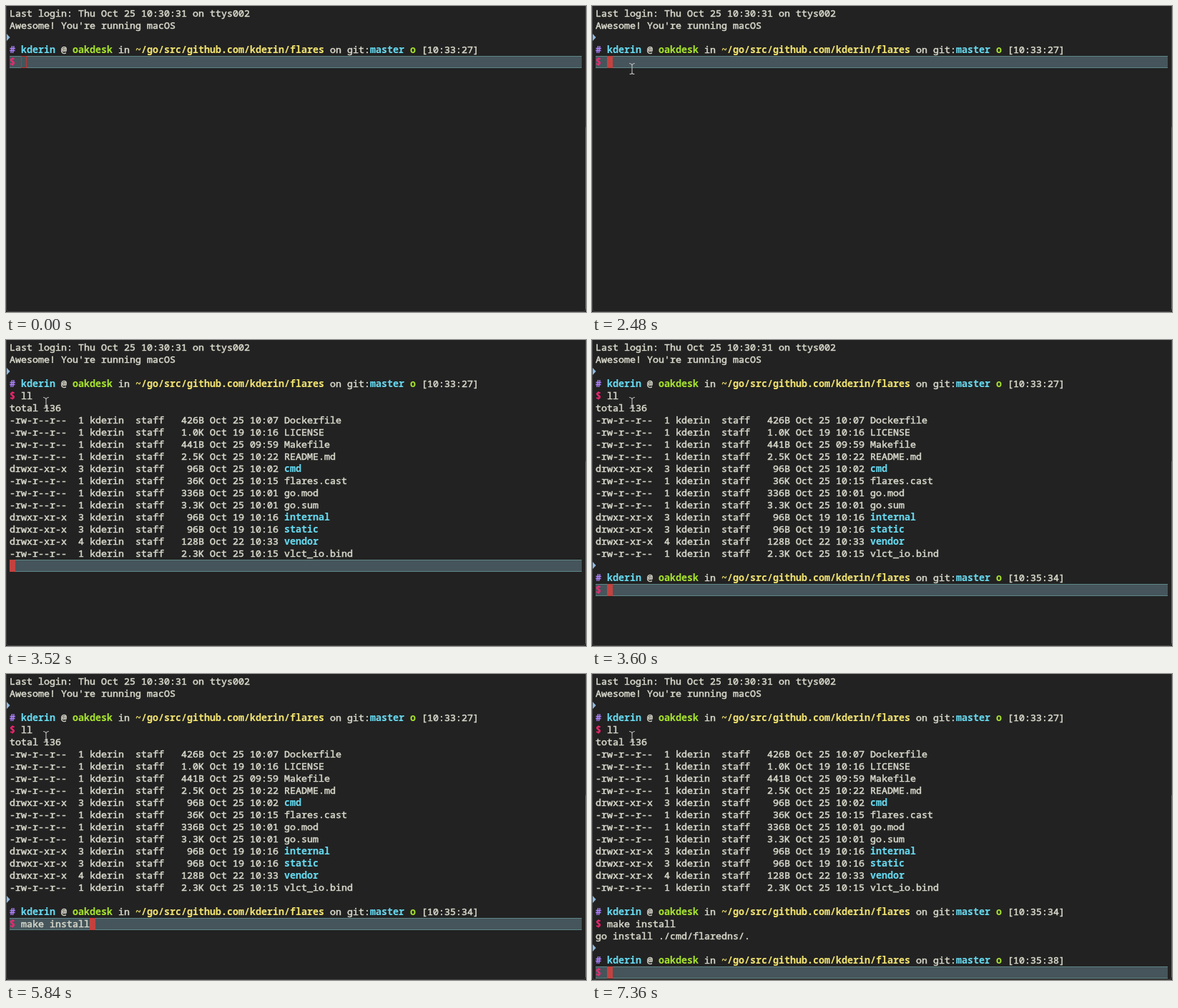
Recreate the animation shown at these times as an HTML page. Size 811 by 429 pixels, loop 8000 ms.

```html
<!DOCTYPE html>
<html lang="en">
<head>
<meta charset="utf-8">
<title>Terminal session</title>
<style>
  html, body { margin: 0; width: 100%; height: 100%; overflow: hidden; background: #222; }
  svg { display: block; width: 811px; height: 429px; }
  text {
    font: 13.333px "Noto Sans Mono", "DejaVu Sans Mono", monospace;
    color: #d8d8cb; fill: currentColor; stroke: currentColor; stroke-width: .5px; white-space: pre;
  }
  .bold { font-weight: 700; stroke-width: .1px; }
</style>
</head>
<body>
<svg id="stage" viewBox="0 0 811 429" xmlns="http://www.w3.org/2000/svg">
  <rect width="811" height="429" fill="#222222"/>
  <path d="M.5 0V425Q.5 428.5 4 428.5H807Q810.5 428.5 810.5 425V0" fill="none" stroke="#454545"/>
  <path d="M810.5 170V425" stroke="#686868"/>
  <g id="bar">
    <rect x="5" width="800" height="17" fill="#45555b"/>
    <path d="M5 .5H805M5 16.5H805" stroke="#5f8587"/>
  </g>
  <rect id="caret" width="8" height="17" fill="#c3423f"/>
  <rect id="hollow" x="21.5" y="70.5" width="7" height="16" fill="none" stroke="#c3322f"/>
  <g id="screen"></g>
  <path id="mouse" d="M-3.5-7.5Q0-7 0-4Q0-7 3.5-7.5M0-4V6M-3 7.5Q0 7.5 0 5.5Q0 7.5 3 7.5"
    fill="none" stroke="#bdbdbd" stroke-width="1.1" stroke-linecap="round"/>
</svg>
<script>
const NS = "http://www.w3.org/2000/svg";
const LOOP = 8000, CELL = 8, LINE = 17, LEFT = 5, TOP = 2;
const USER = "kderin", HOST = "oakdesk";
const CYAN = "#66d9ef", GREEN = "#a6e22e", YELLOW = "#f0e270", PURPLE = "#ae81ff", PINK = "#f92672";
const $ = id => document.getElementById(id);
const colX = c => LEFT + c * CELL;
const rowY = r => TOP + r * LINE;

function add(parent, tag, attrs) {
  const el = document.createElementNS(NS, tag);
  for (const k in attrs) el.setAttribute(k, attrs[k]);
  return parent.appendChild(el);
}

function group() { return add($("screen"), "g", {}); }

// Each word sits on the character grid.
function put(parent, row, col, str, color, bold) {
  for (const m of str.matchAll(/\S+/g)) {
    const el = add(parent, "text", { x: colX(col + m.index), y: rowY(row) + 13 });
    el.textContent = m[0];
    if (color) el.style.color = color;
    if (bold) el.setAttribute("class", "bold");
  }
}

function prompt(parent, row, time) {
  add(parent, "path", { d: `M1 ${rowY(row) + 3}l4.5 5l-4.5 5z`, fill: "#8fbbe0" });
  const parts = [
    ["#", PURPLE, 1], [USER, CYAN, 1], ["@"], [HOST, GREEN, 1], ["in"],
    [`~/go/src/github.com/${USER}/flares`, YELLOW, 1], ["on"], ["git:"],
    ["master", CYAN, 1], ["o", GREEN, 1], [`[${time}]`]
  ];
  let col = 0;
  for (const [str, color, bold] of parts) {
    put(parent, row + 1, col, str, color, bold);
    col += str.length + (str === "git:" ? 0 : 1);
  }
  put(parent, row + 2, 0, "$", PINK, true);
}

function typed(row) {
  return add($("screen"), "text", { x: colX(2), y: rowY(row) + 13 });
}

const intro = group();
put(intro, 0, 0, "Last login: Thu Oct 25 10:30:31 on ttys002");
put(intro, 1, 0, "Awesome! You're running macOS");
prompt(intro, 2, "10:33:27");

const files = [
  "426B Oct 25 10:07 Dockerfile", "1.0K Oct 19 10:16 LICENSE",
  "441B Oct 25 09:59 Makefile", "2.5K Oct 25 10:22 README.md",
  "96B Oct 25 10:02 cmd/3", "36K Oct 25 10:15 flares.cast",
  "336B Oct 25 10:01 go.mod", "3.3K Oct 25 10:01 go.sum",
  "96B Oct 19 10:16 internal/3", "96B Oct 19 10:16 static/3",
  "128B Oct 22 10:33 vendor/4", "2.3K Oct 25 10:15 vlct_io.bind"
];
const listing = group();
put(listing, 5, 0, "total 136");
files.forEach((line, i) => {
  const [size, month, day, time, entry] = line.split(" ");
  const [name, links] = entry.split("/");
  const mode = links ? "drwxr-xr-x" : "-rw-r--r--";
  put(listing, 6 + i, 0, `${mode}  ${links || 1} ${USER}  staff  ${size.padStart(5)} ${month} ${day} ${time}`);
  put(listing, 6 + i, 48, name, links && CYAN, links);
});

const second = group();
prompt(second, 18, "10:35:34");
const build = group();
put(build, 21, 0, "go install ./cmd/flaredns/.");
const third = group();
prompt(third, 22, "10:35:38");

const list = typed(4), make = typed(20);

// [time, characters typed]
const listKeys = [[3200, 1], [3360, 2]];
const makeKeys = [[4800, 2], [4880, 3], [5040, 4], [5120, 5], [5280, 7],
                  [5360, 8], [5520, 9], [5600, 10], [5760, 11], [5840, 12]];
// [time, caret row, column where input starts]
const rows = [[0, 4, 2], [3520, 18, 0], [3600, 20, 2], [6880, 22, 0], [7360, 24, 2]];

const count = (keys, t) => keys.reduce((n, [at, len]) => t >= at ? len : n, 0);
const show = (el, on) => el.setAttribute("display", on ? "inline" : "none");
const move = (el, x, y) => el.setAttribute("transform", `translate(${x} ${y})`);

function draw(t) {
  const l = count(listKeys, t), m = count(makeKeys, t);
  list.textContent = "ll".slice(0, l);
  make.textContent = "make install".slice(0, m);
  show(listing, t >= 3520);
  show(second, t >= 3600);
  show(build, t >= 6880);
  show(third, t >= 7360);

  const [, row, start] = rows.filter(r => t >= r[0]).pop();
  const col = start + (row === 4 ? l : row === 20 ? m : 0);
  move($("bar"), 0, rowY(row));
  move($("caret"), colX(col), rowY(row));
  const focused = t >= 960;
  show($("caret"), focused);
  show($("hollow"), !focused);

  // The pointer glides in from the lower right in 80 ms steps.
  const p = Math.min(1, Math.max(0, (Math.floor(t / 80) * 80 - 320) / 720));
  const rest = (1 - p) ** 3;
  show($("mouse"), t >= 400);
  move($("mouse"), Math.round(56 + 755 * rest), Math.round(88 + 341 * rest));
}

const begin = performance.now();
function tick() {
  draw((performance.now() - begin) % LOOP);
  requestAnimationFrame(tick);
}
draw(0);
requestAnimationFrame(tick);
</script>
</body>
</html>
```
